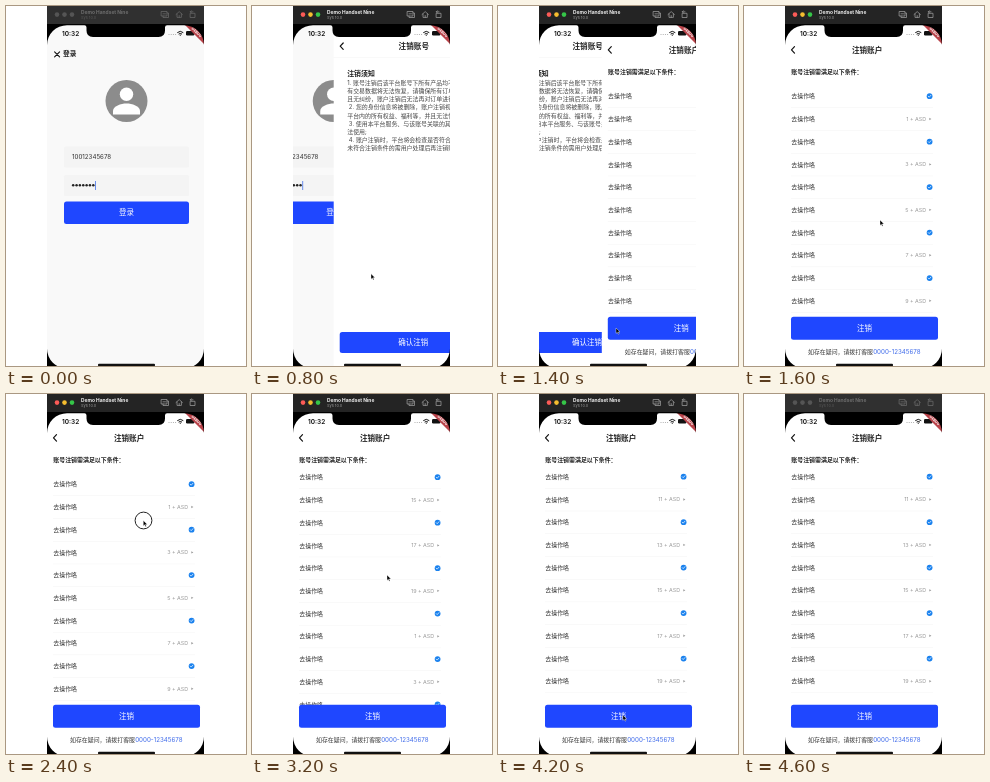
Write an HTML page that moves like this. It is 240 px wide and 360 px high and loops after 4.8 s.

```html
<!DOCTYPE html>
<html lang="zh-CN">
<head>
<meta charset="utf-8">
<style>
  html, body { margin: 0; width: 100%; height: 100%; overflow: hidden; background: #fff; }
  svg { display: block; width: 100vw; height: 100vh; }
  text { font-family: Inter, "Noto Sans CJK SC", "Noto Sans CJK", sans-serif; white-space: pre; }
</style>
</head>
<body>
<svg id="stage" viewBox="0 0 240 360"></svg>
<script>
const LOOP = 4800, STEP = 200;
const LEFT = 41, WIDTH = 157;
const ROW_PITCH = 22.73, ROW_COUNT = 40, PAGE_SIZE = 20;
const BLUE = '#1f47ff';

const stage = document.getElementById('stage');
const clamp = v => Math.min(1, Math.max(0, v));
const smooth = v => v * v * (3 - 2 * v);

// Linear interpolation over [time, ...values] points.
function follow(points, t) {
  const next = points.findIndex(p => p[0] >= t);
  if (next === 0) return points[0].slice(1);
  if (next < 0) return points[points.length - 1].slice(1);
  const a = points[next - 1], b = points[next];
  const u = (t - a[0]) / (b[0] - a[0]);
  return a.slice(1).map((v, i) => v + (b[i + 1] - v) * u);
}

const rect = (x, y, w, h, fill, r = 0) =>
  `<rect x="${x}" y="${y}" width="${w}" height="${h}" rx="${r}" fill="${fill}"/>`;
const circle = (x, y, r, fill, extra = '') =>
  `<circle cx="${x}" cy="${y}" r="${r}" fill="${fill}" ${extra}/>`;
const line = (d, color, width = 1) =>
  `<path d="${d}" fill="none" stroke="${color}" stroke-width="${width}" stroke-linecap="round" stroke-linejoin="round"/>`;
const group = (content, attrs) => `<g ${attrs}>${content}</g>`;

// y is the vertical middle of the text.
function label(x, y, size, content, { fill = '#333', weight = 400, anchor = 'start' } = {}) {
  return `<text x="${x}" y="${y + size * 0.36}" font-size="${size}" font-weight="${weight}" ` +
    `fill="${fill}" text-anchor="${anchor}">${content}</text>`;
}

const button = (x, y, w, h, content) =>
  rect(x, y, w, h, BLUE, 2.5) +
  label(x + w / 2, y + h / 2, 7.5, content, { fill: '#fff', weight: 500, anchor: 'middle' });

const pageHeader = (x, y, title) =>
  rect(LEFT, 18, WIDTH, 342, '#fff') +
  line(`M50.5 ${y - 3.2} L47.5 ${y} L50.5 ${y + 3.2}`, '#111', 1.2) +
  label(x, y, 7.6, title, { fill: '#222', weight: 700 });

function loginPage() {
  const dots = Array.from({ length: 7 }, (_, i) => circle(67.2 + i * 3.35, 179.2, 1.25, '#222')).join('');
  return rect(LEFT, 18, WIDTH, 342, '#f9f9f9') +
    line('M48.6 45.8 L53.6 50.8 M53.6 45.8 L48.6 50.8', '#111', 1.1) +
    label(57, 48, 6.7, '登录', { fill: '#222', weight: 700 }) +
    circle(120.5, 95, 21, '#8c8c8c') +
    circle(120.5, 88.3, 6.7, '#fff') +
    '<path d="M107 108.5V105C107 100 115 97.5 120.5 97.5S134 100 134 105V108.5Z" fill="#fff"/>' +
    rect(58, 140.5, 125, 21, '#f4f4f4', 1.5) +
    label(66, 151, 6.2, '10012345678') +
    rect(58, 169, 125, 21, '#f4f4f4', 1.5) + dots +
    rect(89.2, 175, 0.7, 9, '#2f62e8') +
    button(58, 195.5, 125, 22.5, '登录');
}

const NOTES = [
  '1. 账号注销后该平台账号下所有产品均不可登录，所',
  '有交易数据将无法恢复，请确保所有订单均已完成并',
  '且无纠纷，账户注销后无法再对订单进行处理;',
  ' 2. 您的身份信息将被删除，账户注销视为自动放弃',
  '平台内的所有权益、福利等，并且无法恢复;',
  ' 3. 使用本平台服务、与该账号关联的其他产品将无',
  '法使用;',
  ' 4. 账户注销时，平台将会检查是否符合注销条件，',
  '未符合注销条件的需用户处理后再注销账户;'
];

function notesPage() {
  return pageHeader(105.9, 40.2, '注销账号') +
    rect(LEFT, 51.5, WIDTH, 0.5, '#f2f2f2') +
    label(54.5, 67.2, 6.9, '注销须知', { fill: '#222', weight: 700 }) +
    NOTES.map((text, i) => label(54.5, 77 + i * 8.12, 5.94, text, { fill: '#444' })).join('') +
    button(47, 326, 147, 21, '确认注销');
}

function listRow(i, y) {
  const n = i % PAGE_SIZE;
  const status = n % 2
    ? label(182.2, y, 5.4, `${n} + ASD`, { fill: '#999', anchor: 'end' }) +
      `<path d="M185.3 ${y - 1.2} L187.4 ${y} L185.3 ${y + 1.2}Z" fill="#999"/>`
    : circle(185.6, y, 2.9, '#1b82ee') +
      line(`M184.2 ${y} L185.2 ${y + 1} L187 ${y - 1}`, '#fff', 0.7);
  return label(47.3, y, 5.95, '去操作咯') + status +
    rect(47, y + ROW_PITCH / 2, 142, 0.4, '#f0f0f0');
}

function listPage(scroll) {
  let rows = '';
  for (let i = 0; i < ROW_COUNT; i++) {
    const y = 90.2 + i * ROW_PITCH - scroll;
    if (y > 70 && y < 322) rows += listRow(i, y);
  }
  return pageHeader(107.9, 43.9, '注销账户') +
    label(47.3, 65.5, 5.95, '账号注销需满足以下条件：', { fill: '#222', weight: 700 }) +
    group(rows, 'clip-path="url(#listArea)"') +
    button(47, 310.8, 147, 22.9, '注销') +
    label(129, 346, 5.92, '如存在疑问，请拨打客服', { anchor: 'end' }) +
    label(129.2, 346, 6.2, '0000-12345678', { fill: '#3f6bea' });
}

function slide(from, to, u) {
  return group(from, `transform="translate(${-WIDTH * u / 3} 0)"`) +
    group(to, `transform="translate(${WIDTH * (1 - u)} 0)"`);
}

const SCROLL = [
  [1600, 0], [1800, -14], [2000, -26], [2200, -10], [2400, 0],
  [2600, 60], [2800, 145], [3000, 240], [3200, 325.2],
  [3400, 440], [3600, 560], [3800, 655], [4000, 689.4]
];

function screen(t) {
  if (t < 400) return loginPage();
  if (t < 1200) return slide(loginPage(), notesPage(), smooth(clamp((t - 200) / 900)));
  if (t < 1400) return notesPage();
  const [scroll] = follow(SCROLL, t);
  return t < 1600 ? slide(notesPage(), listPage(0), 0.6) : listPage(scroll);
}

function statusBar() {
  return label(56, 27.2, 6.5, '10:32', { fill: '#111', weight: 600 }) +
    [163, 165.2, 167.4, 169.6].map(x => circle(x, 28.4, 0.5, '#999')).join('') +
    line('M171.6 26.4 Q174.3 24 177 26.4 M172.9 27.9 Q174.3 26.7 175.7 27.9', '#111', 1) +
    circle(174.3, 29.2, 0.6, '#111') +
    rect(180, 25, 8.4, 4.4, '#111', 1.2) + rect(188.9, 26.4, 0.6, 1.6, '#777');
}

function banner() {
  return '<path d="M179 19H188L198 29V38Z" fill="#b9434a"/>' +
    group(label(0, 0, 3.6, 'DEBUG', { fill: '#fff', weight: 700, anchor: 'middle' }),
      'transform="translate(190.7 26.3) rotate(45)"');
}

// Black surround with the rounded screen cut out, plus notch and home bar.
function bezel() {
  return '<path fill="#000" fill-rule="evenodd" d="M41 18H198V363H41Z ' +
    'M61 19.2H178A20 20 0 0 1 198 39.2V342.5A20 20 0 0 1 178 362.5H61A20 20 0 0 1 41 342.5V39.2A20 20 0 0 1 61 19.2Z"/>' +
    '<path d="M78.5 19H161Q159 19.2 159 21.5V24.5Q159 31 152.5 31H87Q80.5 31 80.5 24.5V21.5Q80.5 19.2 78.5 19Z" fill="#000"/>' +
    rect(92, 357.8, 57, 2.4, '#111', 1);
}

const ACTIVE = {
  bar: '#242424', lights: ['#fc5b57', '#f5bd2f', '#35c648'],
  title: '#f0f0f0', subtitle: '#999', icon: '#a5a5a5'
};
const INACTIVE = {
  bar: '#303030', lights: ['#555', '#555', '#555'],
  title: '#6e6e6e', subtitle: '#575757', icon: '#6e6e6e'
};

function windowBar({ bar, lights, title, subtitle, icon }) {
  return rect(LEFT, 0, WIDTH, 18, bar) +
    lights.map((color, i) => circle(51 + i * 7.5, 8.6, 2.3, color)).join('') +
    label(75, 6, 4.9, 'Demo Handset Nine', { fill: title, weight: 700 }) +
    label(75, 12, 3.9, 'Sys 10.0', { fill: subtitle }) +
    line('M155.5 5.5H161V10H155.5Z M157 10V11.5H162.5V7H161 M157 7.8H159.5', icon, 0.7) +
    line('M170 8.5L173.2 5.6L176.4 8.5 M171 8V11.4H175.4V8 M173.2 11.4V9.5', icon, 0.7) +
    line('M184.5 7.3H189V11.5H184.5Z M184.3 5.8H187 M185.4 4.7L184.3 5.8L185.4 6.9', icon, 0.7);
}

const POINTER = [
  [200, 123, 207], [400, 122, 215], [1200, 116, 320.5], [1400, 118, 322],
  [1600, 136, 214], [2000, 137, 165], [2400, 137.3, 126.5], [2800, 136, 150],
  [3200, 135, 181], [3600, 134, 200], [4000, 124.8, 321], [4400, 124.8, 321]
];

function pointer(t) {
  const [x, y] = follow(POINTER, t);
  const ring = t === 2400
    ? circle(137.5, 126.5, 8.4, '#fff', 'fill-opacity=".6" stroke="#222" stroke-width="1"') : '';
  return ring + `<path transform="translate(${x} ${y})" d="M0 0V5.4L1.3 4.3L2.2 6.2L3.1 5.8L2.2 3.9H4Z" ` +
    'fill="#000" stroke="#fff" stroke-width=".4"/>';
}

function draw(time) {
  const t = Math.floor((time % LOOP) / STEP) * STEP;
  const active = t >= 200 && t < 4600;
  stage.innerHTML =
    `<defs><clipPath id="phone">${rect(LEFT, 18, WIDTH, 342, '#fff')}</clipPath>` +
    `<clipPath id="listArea">${rect(LEFT, 78.5, WIDTH, 232.5, '#fff')}</clipPath></defs>` +
    group(screen(t) + statusBar() + banner() + bezel(), 'clip-path="url(#phone)"') +
    windowBar(active ? ACTIVE : INACTIVE) + (active ? pointer(t) : '');
}

const start = performance.now();
let lastStep = 0;
function tick() {
  const time = performance.now() - start;
  const step = Math.floor(time / STEP);
  if (step !== lastStep) draw(time);
  lastStep = step;
  requestAnimationFrame(tick);
}
draw(0);
requestAnimationFrame(tick);
</script>
</body>
</html>
```
